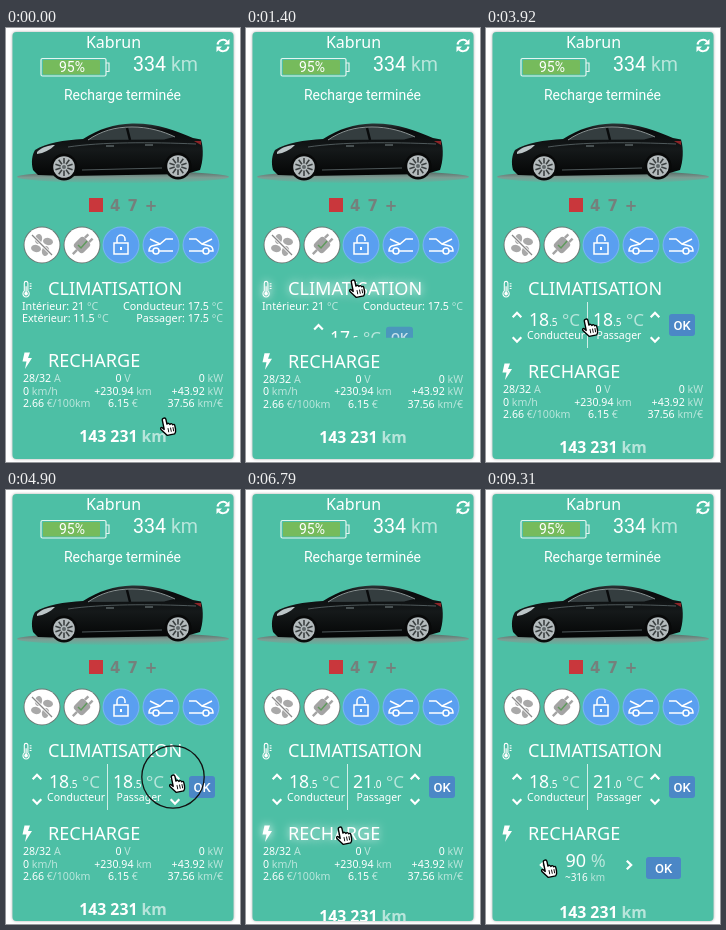
These frames come from a looping animation (234 by 434 pixels, 9.45 s). An HTML page with a canvas:

```html
<!DOCTYPE html>
<html lang="fr">
<head>
<meta charset="utf-8">
<style>
  html, body { margin: 0; width: 100%; height: 100%; overflow: hidden; background: #fff; }
  canvas { display: block; width: 234px; height: 434px; }
</style>
</head>
<body>
<canvas></canvas>
<script>
const W = 234, H = 434, LOOP = 9450, STEP = 70;
const NOTO = '"Noto Sans", sans-serif', ROBOTO = 'Roboto, sans-serif';
const TEAL = '#4dbfa5', BLUE = '#5a9ff0';
const CARD = [6.5, 4, 221, 427, 4];
const canvas = document.querySelector('canvas');
const c = canvas.getContext('2d');
const dpr = window.devicePixelRatio || 1;
canvas.width = W * dpr;
canvas.height = H * dpr;

const clamp = v => Math.max(0, Math.min(1, v));
const swing = p => 0.5 - Math.cos(Math.PI * p) / 2;
const ramp = (t, a, b) => clamp((t - a) / (b - a));
const ease = (t, a, b) => swing(ramp(t, a, b));
const clicks = (t, times) => times.filter(k => t >= k).length;

// Pointer stops: time, x, y of the fingertip
const POINTER = [
  [70, 158, 391], [630, 107, 253], [1960, 107, 253], [2450, 73, 284],
  [3220, 73, 284], [3640, 100, 292], [4130, 100, 292], [4620, 167, 286],
  [5880, 167, 286], [6510, 94, 338], [7210, 94, 338], [7560, 58, 367],
  [8050, 58, 367], [8400, 59, 371]
];

function pointerAt(t) {
  let [, x, y] = POINTER[0];
  for (let i = 1; i < POINTER.length; i++) {
    const [a, x0, y0] = POINTER[i - 1], [b, x1, y1] = POINTER[i];
    if (t < a) break;
    const p = ease(t, a, b);
    x = x0 + (x1 - x0) * p;
    y = y0 + (y1 - y0) * p;
  }
  return { x, y };
}

function fillPath(d, color) {
  c.fillStyle = color;
  c.fill(new Path2D(d));
}

function strokePath(d, color = '#fff', width = 1.5) {
  c.strokeStyle = color;
  c.lineWidth = width;
  c.stroke(new Path2D(d));
}

function disc(x, y, r, color) {
  c.fillStyle = color;
  c.beginPath();
  c.arc(x, y, r, 0, 7);
  c.fill();
}

function box(x, y, w, h, r, color) {
  c.fillStyle = color;
  c.beginPath();
  c.roundRect(x, y, w, h, r);
  c.fill();
}

function at(x, y, draw) {
  c.save();
  c.translate(x, y);
  draw();
  c.restore();
}

function clipped(y, h, draw) {
  if (h <= 0) return;
  c.save();
  c.beginPath();
  c.rect(7, y, 220, h);
  c.clip();
  c.translate(0, y);
  draw();
  c.restore();
}

// Runs are [text, size, pale]; align is 0 left, 0.5 centre, 1 right
function runs(x, y, align, parts, weight = 400, family = NOTO) {
  const setFont = size => { c.font = `${weight} ${size}px ${family}`; };
  const widths = parts.map(([s, size]) => { setFont(size); return c.measureText(s).width; });
  x -= align * widths.reduce((a, b) => a + b, 0);
  parts.forEach(([s, size, pale], i) => {
    setFont(size);
    c.fillStyle = pale ? 'rgba(255,255,255,.6)' : '#fff';
    c.fillText(s, x, y);
    x += widths[i];
  });
}

const label = (x, y, align, size, text, unit = '', weight, family) =>
  runs(x, y, align, [[text, size], [unit, size, true]], weight, family);

function chevron(x, y, turn) {
  at(x, y, () => {
    c.rotate(turn * Math.PI / 2);
    strokePath('M-4.3 2.2 L0 -2.2 L4.3 2.2', '#fff', 2.2);
  });
}

function okButton(x, y, w, alpha) {
  c.save();
  c.globalAlpha = alpha;
  box(x, y, w, 22, 3, '#4b87c6');
  label(x + w / 2, y + 15.5, 0.5, 13, 'OK', '', 500, ROBOTO);
  c.restore();
}

function temperature(x, y, value) {
  const [whole, tenth] = value.toFixed(1).split('.');
  runs(x, y, 0, [[whole, 17.6], ['.' + tenth, 10], [' °C', 17, true]]);
}

function car() {
  const shade = c.createLinearGradient(0, 143, 0, 156);
  shade.addColorStop(0, '#52625e');
  shade.addColorStop(0.5, '#7d9c93');
  shade.addColorStop(1, TEAL);
  c.fillStyle = shade;
  c.beginPath();
  c.ellipse(117, 149, 106, 6, 0, 0, 7);
  c.fill();
  const paint = c.createLinearGradient(0, 95, 0, 148);
  paint.addColorStop(0, '#30383a');
  paint.addColorStop(0.15, '#090b0c');
  paint.addColorStop(0.5, '#15191a');
  paint.addColorStop(1, '#040505');
  fillPath('M27 142C25 134 26 127 29 122C40 115 58 112 77 111C93 101 108 96 126 95.5C151 95 171 103 187 110L195 111.5C198 121 197 134 194 142L180 146L62 148L32 147Z', paint);
  fillPath('M82 112C95 103.5 109 99.5 126 99.5C142 99.5 157 103 168 109L158 111.5Z', '#343d3f');
  strokePath('M82 112C95 103 109 99 126 99C142 99 157 103 169 109', '#a9b3b3', 0.8);
  strokePath('M121 100L124 112', '#090b0c', 2.5);
  strokePath('M62 119C95 114 145 114 190 116M76 142L156 140', '#566063', 0.9);
  strokePath('M100 118h8M139 117h8', '#7a8688', 1);
  fillPath('M31 124C36 119 43 117 49 117C44 122 38 125 31 126Z', '#bcc6c8');
  fillPath('M188 113L195 113L195 117Z', '#8d2427');
  for (const [x, y] of [[58, 139], [172, 138]]) {
    disc(x, y, 13.5, '#080909');
    disc(x, y, 10.8, '#b4bbbd');
    at(x, y, () => {
      for (let i = 0; i < 10; i++) {
        c.rotate(Math.PI / 5);
        strokePath('M0 -3.5V-9', '#3b4041', 1.6);
      }
    });
    disc(x, y, 2, '#60686a');
  }
}

// Half a car with its lid raised
function openLid() {
  strokePath('M-11 -6L-1 -1L5 -6H12M-1 -1L-9 1Q-12 2 -12 6H-8M-2 6H12');
  strokePath('M-8 6a3 3 0 1 0 6 0a3 3 0 1 0 -6 0');
}

function actionButtons() {
  [36, 76, 115, 155, 195].forEach((x, i) => {
    disc(x, 217, 18.5, i < 2 ? '#6d7774' : '#78b4f5');
    disc(x, 217, 17.5, i < 2 ? '#fff' : BLUE);
  });
  at(36, 217, () => {
    c.fillStyle = '#a9a9a9';
    for (let i = 0; i < 4; i++) {
      c.rotate(Math.PI / 2);
      c.beginPath();
      c.ellipse(6, -3.5, 5, 3.6, 0.2, 0, 7);
      c.fill();
    }
    strokePath('M-10 -10L10 10', '#fff', 3);
    strokePath('M-10 -10L10 10', '#888', 1.3);
  });
  at(76, 217, () => {
    c.rotate(Math.PI / 4);
    box(-6.5, -7, 13, 14, 3.5, '#a4a4a4');
    strokePath('M-3 -7v-5M3 -7v-5M0 7v6', '#a4a4a4', 2.4);
    c.rotate(-Math.PI / 4);
    strokePath('M-4 0L-1 3L5 -4', '#5f9a5c', 1.5);
  });
  at(115, 217, () => {
    strokePath('M-7 -2H7V9H-7ZM-4 -2V-6a4 4 0 0 1 8 0V-4');
    strokePath('M0 2V5', '#fff', 2);
  });
  at(155, 217, openLid);
  at(195, 217, () => { c.scale(-1, 1); openLid(); });
}

function header() {
  label(107.5, 20, 0.5, 16, 'Kabrun');
  at(217, 17.5, () => {
    strokePath('M-5.5 -1A5.6 5.6 0 0 1 4 -4M5.5 1A5.6 5.6 0 0 1 -4 4', '#fff', 2);
    fillPath('M6.5 -6.5V-1H1ZM-6.5 6.5V1H-1Z', '#fff');
  });
  box(37, 32, 57, 14.5, 1, '#76bb5c');
  strokePath('M36.5 30.5H98.5Q100 30.5 100 32V46.5Q100 48 98.5 48H36.5Q35 48 35 46.5V32Q35 30.5 36.5 30.5ZM100 35H103V43.5H100', 'rgba(255,255,255,.85)', 1.2);
  label(66, 44, 0.5, 14, '95%', '', 400, ROBOTO);
  label(127, 43, 0, 19.6, '334', ' km', 400, ROBOTO);
  label(116.5, 72, 0.5, 14, 'Recharge terminée', '', 400, ROBOTO);
  car();
  box(83, 170, 14, 14, 0, '#c9373c');
  c.font = 'bold 15px "DejaVu Sans", sans-serif';
  c.letterSpacing = '7px';
  c.fillStyle = '#75807c';
  c.fillText('47+', 104, 182.5);
  c.letterSpacing = '0px';
  actionButtons();
}

function title(y, text, icon, pointer) {
  c.save();
  if (pointer.y > y - 14 && pointer.y < y + 10) {
    c.shadowColor = '#fff';
    c.shadowBlur = 9 * dpr;
  }
  label(42, y + 6.3, 0, 18.1, text);
  at(21, y, icon);
  c.restore();
}

function thermometer() {
  c.scale(0.9, 0.95);
  strokePath('M-3 2V-6a2 2 0 0 1 4 0V2a3.5 3.5 0 1 1 -4 0ZM3 -5.5H5M3 -3H5M3 -.5H5', '#fff', 1.2);
  disc(-1, 4.8, 2, '#fff');
  strokePath('M-1 4V-3', '#fff', 1.3);
}

const bolt = () => fillPath('M-2.5 -8H3L1 -2.5H5L-2 8.5L-.5 1H-4.5Z', '#fff');

function climateInfo() {
  label(16, 10, 0, 10.7, 'Intérieur: 21', ' °C');
  label(217, 10, 1, 10.7, 'Conducteur: 17.5', ' °C');
  label(16, 22, 0, 10.7, 'Extérieur: 11.5', ' °C');
  label(217, 22, 1, 10.7, 'Passager: 17.5', ' °C');
}

function climatePanel(t) {
  const driver = 17.5 + clicks(t, [2870, 3080]) / 2;
  const passenger = 18.5 + clicks(t, [5040, 5110, 5250, 5390, 5600]) / 2;
  if (t < 3780) {
    chevron(72.5, 14.5, 0);
    chevron(72.5, 39.5, 2);
    temperature(84, 31.5, driver);
    okButton(140, 14, 27, 0.7 + 0.3 * ramp(t, 2800, 3080));
    return;
  }
  for (const x of [31, 169]) {
    chevron(x, 15, 0);
    chevron(x, 39.5, 2);
  }
  temperature(43, 25.5, driver);
  temperature(107, 25.5, passenger);
  label(70, 39, 0.5, 10.5, 'Conducteur');
  label(133, 39, 0.5, 10.5, 'Passager');
  strokePath('M101.5 2V48', 'rgba(255,255,255,.75)', 1);
  okButton(183, 14, 26, 1);
}

function chargeInfo() {
  const rows = [
    ['28/32', ' A', '0', ' V', '0', ' kW'],
    ['0', ' km/h', '+230.94', ' km', '+43.92', ' kW'],
    ['2.66', ' €/100km', '6.15', ' €', '37.56', ' km/€']
  ];
  rows.forEach((row, i) => [17, 117, 217].forEach((x, k) =>
    label(x, 11 + i * 12.5, k / 2, 10.6, row[2 * k], row[2 * k + 1])));
}

function chargePanel(t) {
  const lowered = t >= 9100;
  chevron(57, 21, 3);
  chevron(143, 21, 1);
  label(99.5, 22.5, 0.5, 18, lowered ? '90' : '95', ' %');
  label(99, 37, 0.5, 10, lowered ? '~316' : '~334', ' km');
  okButton(160, 13, 35, 0.7 + 0.3 * ramp(t, 9030, 9240));
}

function hand({ x, y }) {
  at(x, y, () => {
    c.rotate(-0.2);
    c.scale(0.93, 0.93);
    c.lineJoin = 'round';
    const shape = 'M-2 1Q-2 -1 0 -1Q2 -1 2 1V6Q4 4.5 5 7Q7 5.5 8 8Q10 7 10 9.5V13Q10 16 8 18H0L-5.5 10.5Q-6 8 -4 8.5L-2 11Z';
    fillPath(shape, '#fff');
    strokePath(shape, '#000', 1.5);
    strokePath('M2.2 10.5V15M5 10.5V15M7.6 10.5V15', '#000', 1);
  });
}

function draw(t) {
  const pointer = pointerAt(t);
  const info = 37 * (1 - ease(t, 1190, 1540));
  const panel = 48 * ease(t, 1210, 1580);
  const shift = info + panel - 37;
  const info2 = 40 * (1 - ease(t, 6760, 7050));
  const panel2 = 43 * ease(t, 6690, 7050);

  c.setTransform(dpr, 0, 0, dpr, 0, 0);
  c.fillStyle = '#fff';
  c.fillRect(0, 0, W, H);
  c.save();
  c.shadowColor = 'rgba(0,0,0,.35)';
  c.shadowBlur = 3 * dpr;
  box(...CARD, TEAL);
  c.restore();

  c.save();
  c.beginPath();
  c.roundRect(...CARD);
  c.clip();
  header();
  title(261, 'CLIMATISATION', thermometer, pointer);
  clipped(272, info, climateInfo);
  clipped(272 + info, panel, () => climatePanel(t));
  title(332.5 + shift, 'RECHARGE', bolt, pointer);
  clipped(343 + shift, info2, chargeInfo);
  clipped(343 + shift + info2, panel2, () => chargePanel(t));
  label(117, 374 + shift + info2 + panel2, 0.5, 15.8, '143 231', ' km', 700);
  c.restore();

  if (t > 4690 && t < 5040) {
    c.strokeStyle = '#111';
    c.lineWidth = 1.3;
    c.beginPath();
    c.arc(pointer.x, pointer.y + 1, 52 * ramp(t, 4690, 5040), 0, 7);
    c.stroke();
  }
  hand(pointer);
}

function frame(now) {
  draw(Math.floor((now % LOOP) / STEP) * STEP);
  requestAnimationFrame(frame);
}
requestAnimationFrame(frame);
</script>
</body>
</html>
```
